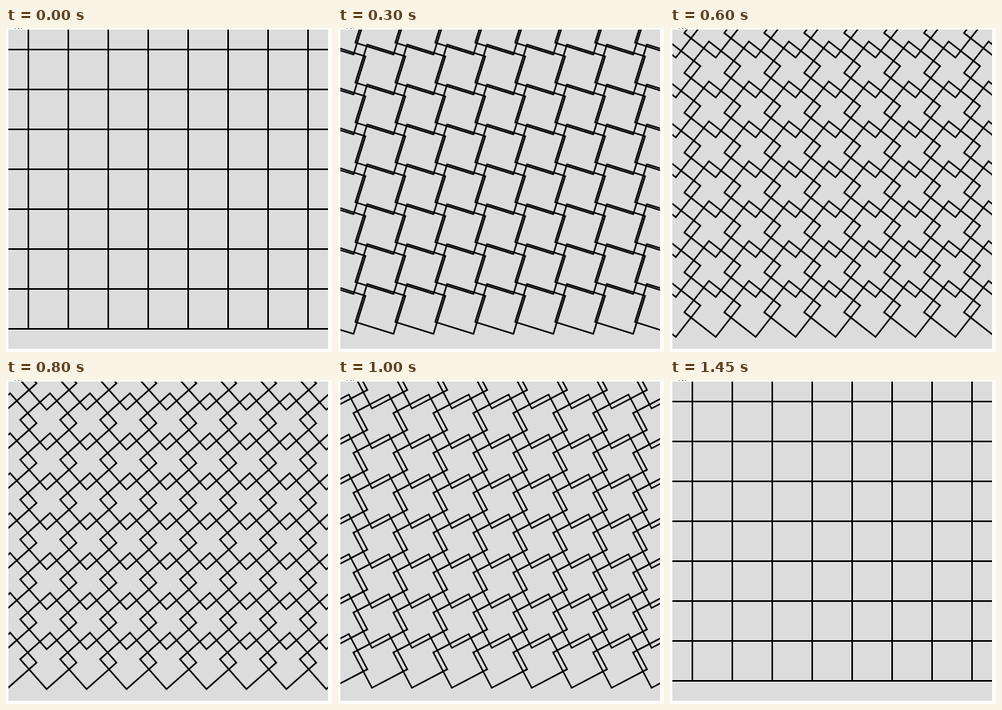
Write an HTML page with a canvas that moves like this. It is 408x406 px and loops after 8 s.

```html
<!DOCTYPE html>
<html lang="en">
<head>
<meta charset="utf-8">
<title>Turning squares</title>
<style>
html, body { margin: 0; width: 100%; height: 100%; overflow: hidden; background: #fcfcfc; }
canvas { display: block; }
</style>
</head>
<body>
<canvas id="stage" width="408" height="406"></canvas>
<script>
const ctx = document.getElementById('stage').getContext('2d');
const LOOP = 8000, TICK = 50, STEPS = 26, SIZE = 50;
const HOLDS = [6, 15, 25]; // ticks on which the squares rest

function stepAt(ms) {
  const tick = Math.floor(ms / TICK + 0.01);
  return Math.min(STEPS, tick - HOLDS.filter(h => h <= tick).length);
}

function draw(step) {
  ctx.fillStyle = '#fcfcfc';
  ctx.fillRect(0, 0, 408, 406);

  // lower edge of a caption cut off by the stage
  ctx.fillStyle = '#777';
  ctx.fillRect(11, 0, 1, 1);
  ctx.fillRect(15, 0, 2, 1);
  ctx.fillRect(19, 0, 1, 1);

  ctx.save();
  ctx.translate(3, 2);
  ctx.beginPath();
  ctx.rect(0, 0, 400, 400);
  ctx.clip();
  ctx.fillStyle = '#dcdcdc';
  ctx.fillRect(0, 0, 400, 400);
  ctx.strokeStyle = '#000';
  ctx.lineWidth = 2;

  const angle = step % STEPS / STEPS * Math.PI / 2;
  for (let row = 0; row < 8; row++) {
    for (let col = 0; col < 9; col++) {
      ctx.save();
      ctx.translate(col * SIZE, row * SIZE);
      ctx.rotate(angle);
      ctx.strokeRect(-SIZE / 2, -SIZE / 2, SIZE, SIZE);
      ctx.restore();
    }
  }
  ctx.restore();
}

let shown = -1;
function frame() {
  const step = stepAt(performance.now() % LOOP);
  if (step !== shown) draw(shown = step);
  requestAnimationFrame(frame);
}
frame();
</script>
</body>
</html>
```
